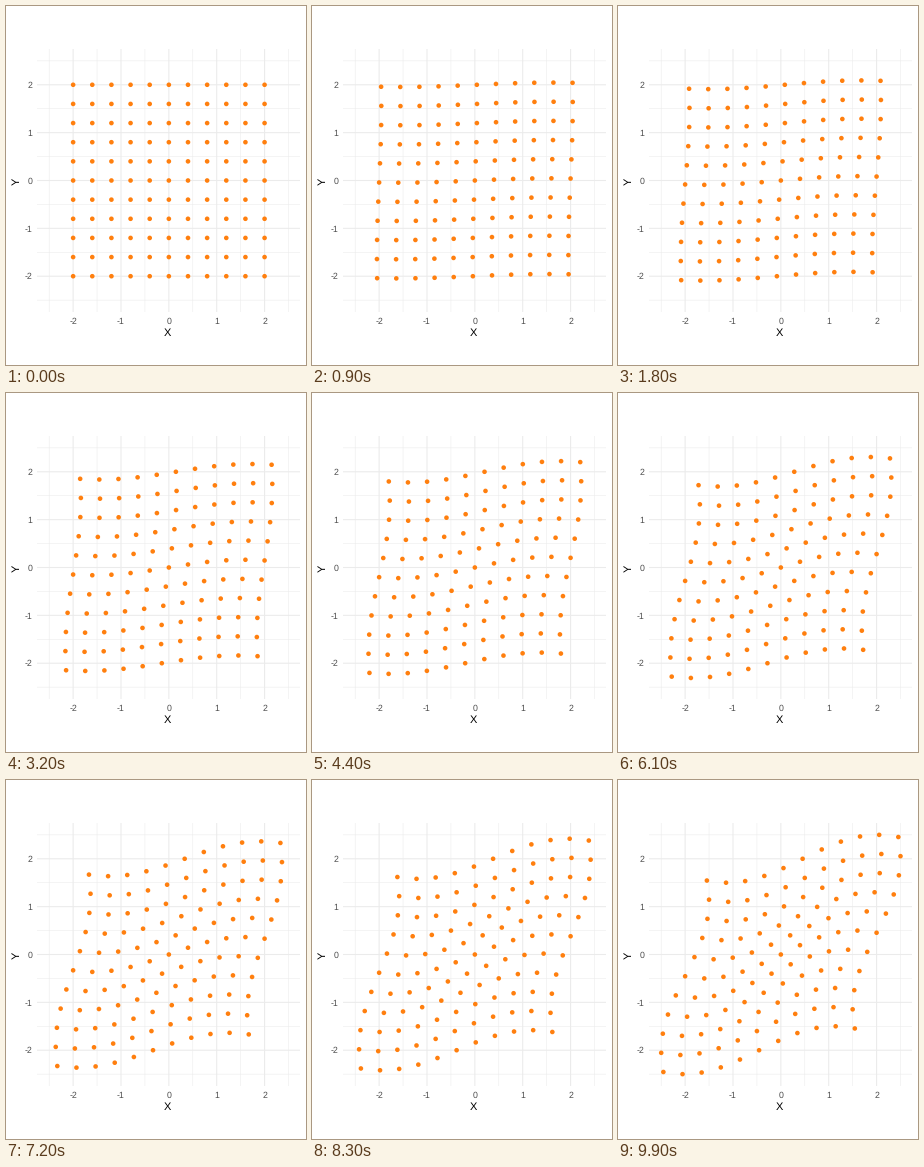
Recreate the animation shown at these times as a matplotlib script. Size 300 px wide and 359 px high, loop 10000 ms.

```python
import numpy as np
import matplotlib.pyplot as plt
from matplotlib.animation import FuncAnimation

W, H, DPI = 300, 359, 72
FRAMES, INTERVAL = 100, 100
CX, CY, UNIT = 162.85, 174.5, 47.86   # panel centre and pixels per unit
LIMIT = 2.75
MAX_SHEAR = 0.5
GRID, TICK, DOT = "#EBEBEB", "#4D4D4D", "#FF7F0E"

plt.rcParams["font.family"] = "Liberation Sans"
plt.rcParams["text.hinting"] = "none"

fig = plt.figure(figsize=(W / DPI, H / DPI), dpi=DPI, facecolor="white")
half = LIMIT * UNIT
ax = fig.add_axes([(CX - half) / W, 1 - (CY + half) / H, 2 * half / W, 2 * half / H])
ax.set(xlim=(-LIMIT, LIMIT), ylim=(-LIMIT, LIMIT))
ax.axis("off")


def label(x, y, text, size, color, **kw):
    fig.text(x / W, 1 - y / H, text, fontsize=size, color=color, va="baseline", **kw)


def grid(values, width):
    for v in values:
        for line in (ax.axvline, ax.axhline):
            line(v, color=GRID, lw=width, snap=False, zorder=1)


grid(np.arange(-2.5, 3), 0.53)
grid(range(-2, 3), 1.07)

for v in range(-2, 3):
    label(CX + v * UNIT, 317.6, str(v), 8.8, TICK, ha="center")
    label(26.4, CY - v * UNIT + 3.2, str(v), 8.8, TICK, ha="right")
label(161.2, 330, "X", 11, "black", ha="center")
label(13.4, 175, "Y", 11, "black", ha="center", rotation=90, rotation_mode="anchor")

steps = np.linspace(-2, 2, 11)
x, y = (a.ravel() for a in np.meshgrid(steps, steps))
# One size per dot keeps sub-pixel placement.
dots = ax.scatter(x, y, s=np.full(x.size, 4.62 ** 2), c=DOT, linewidths=0,
                  zorder=3, clip_on=False)


def update(i):
    a = MAX_SHEAR * i / (FRAMES - 1)
    dots.set_offsets(np.column_stack([x + a * np.sin(y), y + a * np.sin(x)]))
    return [dots]


anim = FuncAnimation(fig, update, frames=FRAMES, interval=INTERVAL,
                     repeat=True, repeat_delay=0, blit=False)
plt.show()
```
